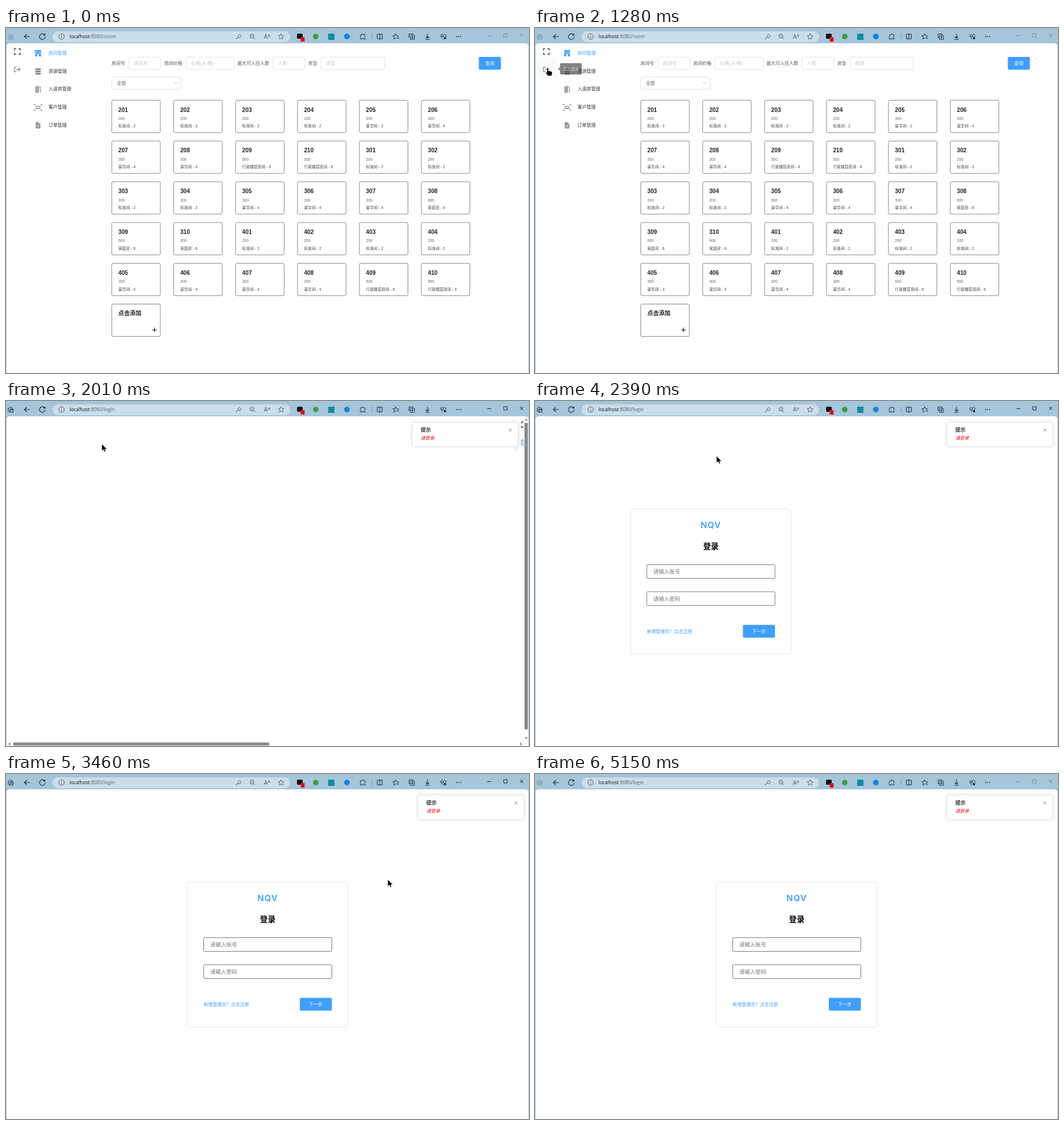
An HTML page with a canvas that plays this animation: 922 px wide and 608 px high, repeating every 5.19 s.

```html
<!DOCTYPE html>
<html lang="zh-CN">
<head>
<meta charset="utf-8">
<title>房间管理</title>
<style>
html, body { margin: 0; width: 100%; height: 100%; overflow: hidden; background: #a4c5da; }
canvas { display: block; }
</style>
</head>
<body>
<canvas id="stage" width="922" height="608"></canvas>
<script>
const ctx = document.getElementById('stage').getContext('2d');
const LOOP = 5190;
const UI = '"Liberation Sans", "Noto Sans CJK SC", "Noto Sans CJK", sans-serif';
const BLUE = '#409eff', GRAY = '#8b8e94', DARK = '#222';

// The screen refreshes in bursts: [first, last, count]
const steps = [0];
for (const [a, b, n] of [[230, 690, 6], [790, 1280, 6], [1370, 1820, 6], [1910, 2390, 6],
  [2480, 2990, 7], [3460, 3940, 6], [4030, 4310, 4], [5150, 5150, 1]])
  for (let i = 0; i < n; i++) steps.push(a + (n > 1 ? (b - a) * i / (n - 1) : 0));

const pointerPath = [
  [230, 587, 586], [690, 134, 192], [1084, 40, 85], [1182, 22, 70], [1280, 20, 69],
  [1640, 20, 69], [1820, 70, 70], [2006, 169, 76], [2390, 320, 97], [2650, 597, 143],
  [2990, 673, 186], [3460, 673, 186], [3940, 718, 301], [4030, 732, 370], [4217, 773, 583], [4310, 773, 583]
];

const clamp = v => Math.max(0, Math.min(1, v));

// cubic-bezier(.25, .1, .25, 1)
function ease(x) {
  if (x <= 0 || x >= 1) return clamp(x);
  const curve = (s, a, b) => 3 * (1 - s) ** 2 * s * a + 3 * (1 - s) * s * s * b + s ** 3;
  let lo = 0, hi = 1;
  for (let i = 0; i < 20; i++) {
    const mid = (lo + hi) / 2;
    if (curve(mid, .25, .25) < x) lo = mid; else hi = mid;
  }
  return curve(lo, .1, 1);
}

// y is the vertical middle of the line
function text(s, x, y, size, color, style = '', font = UI) {
  ctx.font = `${style} ${size}px ${font}`;
  ctx.fillStyle = color;
  ctx.fillText(s, x, y + size * .37);
  return ctx.measureText(s).width;
}

function box(x, y, w, h, r, fill, stroke, width = 1) {
  ctx.beginPath();
  ctx.roundRect(x, y, w, h, r);
  if (fill) { ctx.fillStyle = fill; ctx.fill(); }
  if (stroke) { ctx.strokeStyle = stroke; ctx.lineWidth = width; ctx.stroke(); }
}

function shape(x, y, d, stroke, width = 1, fill) {
  const path = new Path2D(d);
  ctx.save();
  ctx.translate(x, y);
  if (fill) { ctx.fillStyle = fill; ctx.fill(path); }
  if (stroke) { ctx.strokeStyle = stroke; ctx.lineWidth = width; ctx.stroke(path); }
  ctx.restore();
}

function dot(x, y, r, fill, stroke) {
  box(x - r, y - r, 2 * r, 2 * r, r, fill, stroke);
}

const STAR = 'M0-5L1.5-1.7 5-1.3 2.4 1.1 3.1 4.6 0 2.9-3.1 4.6-2.4 1.1-5-1.3-1.5-1.7Z';

function drawBrowser(route, focused) {
  const ink = '#1d2b35', soft = '#465b69', chrome = focused ? ink : '#7793a4';
  ctx.fillStyle = '#a4c5da';
  ctx.fillRect(0, 0, 922, 608);
  box(82, 6, 419, 19, 9.5, '#cbdde8');
  box(1, 27, 920, 590, 5, '#fefefe');

  shape(8, 15, 'M-4-2L0-4.5 4-2M-4-2V3L-1 4.5M-1-1H4.500V4.500H-1ZM-1 1H4', chrome);
  shape(37, 15, 'M5 0H-4.500M-.5-4L-4.500 0-.5 4', ink, 1.1);
  shape(64, 15, 'M4.300-2.500A5 5 0 1 0 5 .5M4.700-5V-2.200H1.800', ink, 1.1);
  dot(98, 15, 4.8, null, soft);
  shape(98, 15, 'M0-2.500V-1.400M0-.3V2.600', soft);
  const w = text('localhost', 112, 15, 8.5, '#111', '', '"Open Sans", "Noto Sans", sans-serif');
  text(':8080/' + route, 112 + w, 15, 8.5, '#566873', '', '"Open Sans", "Noto Sans", sans-serif');

  shape(410, 15, 'M-.5 .8L-4 4.300V2.800M-.5 .8A2.600 2.600 0 1 1 1 2Z', soft);
  shape(434, 15, 'M2.300 2L4.800 4.500M3-.8A3.500 3.500 0 1 1-4-.8A3.500 3.500 0 1 1 3-.8M-2-.8H1', soft);
  shape(460, 15, 'M-5 4L-2-4 1 4M-4 1.500H0M2-3Q3.500-2 2.500 0M4-4Q5.500-2 4 1', soft, .9);
  shape(485, 15, STAR, soft, .9);

  box(513, 10, 10, 9, 2, '#111');
  box(519.500, 16, 7, 8, 1, '#f3131d');
  text('1', 521.700, 20, 6, '#111');
  dot(546, 15, 4.800, '#3f9a3d');
  box(568, 10, 11, 11, 0, '#168ba0');
  dot(601, 15, 5, '#1683e5');
  shape(629, 15, 'M-4-3H-1.500A1.500 1.500 0 0 1 1.500-3H4V-.5A1.500 1.500 0 0 0 4 2V4.500H1.500A1.500 1.500 0 0 0-1.500 4.500H-4V2A1.500 1.500 0 0 1-4-.5Z', ink);
  shape(645, 15, 'M0-5V5', '#7d9aab');
  shape(659, 15, 'M-4.500-4H4.500V4H-4.500ZM0-5.500V5.500', ink);
  shape(687, 15, 'M1.500-1.500L0-4.800-1.500-1.500-5-1.200-2.500 1-3.200 4.500 0 2.500M2.500-1.500H5.500M1.500 1H5.500M2.500 3.500H5.500', ink);
  shape(715, 15, 'M-2-2H5V5H-2ZM-3 2H-4.500V-4.500H2.500V-3M1.500-.5V3.500M-.5 1.500H3.500', ink);
  shape(743, 15, 'M0-5V3M-3 0L0 3 3 0M-4 5H4', ink, 1.1);
  shape(771, 15, 'M0 4.500L-4 .5C-6-2-2.500-6 0-2.500C2.500-6 6-2 4 .5M-4 0H-1L0-1.500 1 1H2', ink);
  dot(774, 18, 2, ink);
  for (const x of [794.500, 798, 801.500]) dot(x, 15, .9, ink);

  shape(852, 13.500, 'M-3.500 0H3.500', chrome);
  shape(880.500, 13, 'M-3-3H3V3H-3Z', chrome);
  shape(909, 13, 'M-3-3L3 3M3-3L-3 3', chrome);
}

function drawMenu(hovered, exitColor, hoverWidth) {
  if (hovered) {
    ctx.fillStyle = hoverWidth < 20 ? '#e9f4ff' : '#f6faff';
    ctx.fillRect(2, 57, hoverWidth, 31);
  }
  shape(20, 41.500, 'M-2-5H-5V-2M2-5H5V-2M-2 5H-5V2M2 5H5V2', '#4b4d52', 1.6);
  shape(20, 73, 'M-1.500-4H-5V4H-1.500M-2.500 0H4.500M2-3L5 0 2 3', exitColor, 1.4);

  ['房间管理', '资源管理', '入退房管理', '客户管理', '订单管理'].forEach((label, i) =>
    text(label, 75, 44 + i * 31.650, 8, i ? '#303133' : BLUE));
  shape(56.500, 44.500, 'M-5.500-5.500H5.500V-4H5V4H5.500V5.500H1.500V3A1.500 1.500 0 0 0-1.500 3V5.500H-5.500V4H-5V-4H-5.500Z', null, 0, BLUE);
  for (const y of [-2.500, .5])
    for (const x of [-3, 0, 3]) { ctx.fillStyle = '#fff'; ctx.fillRect(55.800 + x, 44 + y, 1.400, 1.400); }
  for (const y of [-5.500, -1.500, 2.500]) box(51.500, 76.500 + y, 10, 3.300, [2, 2, 3, 3], GRAY);
  shape(56.500, 108, 'M-5.500 4.500H-4V-4L1-5.500V5.500H-4M2-4H4V4.500H5.500', GRAY, 1.200);
  shape(56.500, 108, 'M-3.500-3.800L1-5.500V5.500H-3.500Z', null, 0, '#a5a8ad');
  shape(56.500, 140, 'M-4-5.500H-6.500V-3M4-5.500H6.500V-3M-4 5.500H-6.500V3M4 5.500H6.500V3', GRAY, 1.200);
  for (const x of [-3, 0, 3]) {
    dot(56.500 + x, 138.500 - (x ? 0 : .5), 1.200, GRAY);
    box(55.200 + x, 140.500, 2.600, 2.500, 1, GRAY);
  }
  shape(56.500, 171.500, 'M-4-5.500H1.500L4-3V5.500H-4Z', null, 0, GRAY);
  shape(56.500, 171.500, 'M-2 0H2M-2 2.500H2M1.500-5.500V-3H4', '#fff', .9);
}

function drawField(x, y, w, label, moving, color = '#c0c4c0') {
  if (moving) shape(x + 3, y, `M0 .5H${w - 4}M0 22H${w - 4}`, '#d8e9ee');
  else box(x + .5, y + .5, w - 1, 21.500, 2, '#fff', '#d8e9ee');
  text(label, x + 9.500, y + 11, 8, color);
}

function roomInfo(floor, n) {
  if (n <= 4) return [200, '标准间 - 2'];
  if (floor === 3 && n >= 8) return [600, '家庭房 - 6'];
  if (n >= 9) return [500, '行政楼层房间 - 6'];
  return [300, floor === 2 && n === 5 ? '豪华间 - 2' : '豪华间 - 4'];
}

function drawRooms(moving) {
  for (const [s, x] of [['房间号', 186], ['房间价格', 279], ['最大可入住人数', 408], ['房型', 533]])
    text(s, x, 62, 8, '#55585e');
  for (const [s, x, w] of [['房间号', 216, 57], ['价格(￥/晚)', 317, 86], ['人数', 470, 57], ['房型', 555, 113]])
    drawField(x, 51, w, s, moving);
  drawField(186, 86, 123, '全部', moving, '#606266');
  shape(299, 97, 'M-3-1.500L0 1.500 3-1.500', '#b4b8bf', .9);
  box(833.500, 51, 39, 22.500, 2, BLUE);
  text('查询', 845, 62, 8, '#fff');

  for (let i = 0; i <= 30; i++) {
    const x = 186.500 + i % 6 * 109.150, y = 127.300 + Math.floor(i / 6) * 71.850;
    box(x, y, 85.500, 57, 2, '#fff', '#77797d', .9);
    if (i === 30) {
      text('点击添加', x + 11.500, y + 16, 10.200, DARK, 'bold');
      shape(x + 75.300, y + 45.500, 'M-4 0H4M0-4V4', DARK, 1.200);
      continue;
    }
    const floor = 2 + Math.floor(i / 10), n = i % 10 + 1;
    const [price, kind] = roomInfo(floor, n);
    text(floor * 100 + n, x + 11.500, y + 16.500, 10.200, DARK, 'bold');
    text(price, x + 11.500, y + 32, 6.850, '#666');
    text(kind, x + 11.500, y + 45.500, 6.850, '#444');
  }
}

function drawTooltip(alpha) {
  ctx.globalAlpha = alpha;
  box(44, 62, 38.500, 20, 2, '#303133');
  shape(44, 72, 'M0-3L-3.500 0 0 3Z', null, 0, '#303133');
  text('退出登录', 49.500, 72, 6.850, '#fff');
  ctx.globalAlpha = 1;
}

function drawLogin() {
  box(319.500, 190.500, 283.500, 255.500, 5, '#fefefe', '#e6e8ec');
  ctx.textAlign = 'center';
  ctx.letterSpacing = '1px';
  text('NQV', 461.500, 218.700, 15, BLUE, '600', 'Inter, sans-serif');
  ctx.letterSpacing = '0px';
  text('登录', 461.500, 256, 13.700, '#000', 'bold');
  ctx.textAlign = 'left';
  ['请输入账号', '请输入密码'].forEach((label, i) => {
    box(348.500, 288.300 + i * 47.800, 226, 24.300, 2, '#fff', '#767676');
    text(label, 360, 300.500 + i * 48, 9.500, '#757575');
  });
  text('新增管理员？点击注册', 348.500, 406, 8, BLUE);
  box(518, 394.500, 56.500, 22.500, 2, BLUE);
  text('下一步', 534, 406, 8, '#fff');
}

function drawNotice(x, alpha) {
  ctx.save();
  ctx.globalAlpha = alpha;
  ctx.shadowColor = 'rgba(0,0,0,.13)';
  ctx.shadowBlur = 6;
  box(x, 37, 187, 43, 4, '#fff');
  ctx.shadowColor = 'transparent';
  box(x + .5, 37.500, 186, 42.500, 4, null, '#e9ebf0');
  text('提示', x + 15, 50.500, 9.100, '#303133', 'bold');
  text('请登录', x + 15, 65.500, 8, '#f00', 'italic');
  shape(x + 173, 51, 'M-2.700-2.700L2.700 2.700M2.700-2.700L-2.700 2.700', '#85888e', .9);
  ctx.restore();
}

function drawScrollbars(shift) {
  const thumb = '#8b8b8b';
  ctx.fillStyle = '#fcfcfc';
  ctx.fillRect(913, 28, 8, 580);
  ctx.fillRect(2, 601, 919, 7);
  box(914, 38, 6, 541, 3, thumb);
  box(12.500, 601.700, 891 * 908 / (896 + shift), 5.500, 2.800, thumb);
  shape(917, 33, 'M-3 1.500L0-2 3 1.500Z', null, 0, thumb);
  shape(917, 594, 'M-3-1.500L0 2 3-1.500Z', null, 0, thumb);
  shape(6, 604.500, 'M1.500-3L-2 0 1.500 3Z', null, 0, thumb);
  shape(908, 604.500, 'M-1.500-3L2 0-1.500 3Z', null, 0, thumb);
}

function drawPointer(t, hand) {
  if (t < 230 || t >= 4310) return;
  const i = pointerPath.findIndex(p => p[0] > t);
  const [t0, x0, y0] = pointerPath[i - 1], [t1, x1, y1] = pointerPath[i];
  const k = (t - t0) / (t1 - t0), x = x0 + (x1 - x0) * k, y = y0 + (y1 - y0) * k;
  if (hand) shape(x + 2, y + 1.500, 'M-1.200 0Q0-1.300 1.200 0V4.500L7 6Q8.500 6.500 8.500 8.500L7.300 14H1L-3.500 8.500Q-2.800 6.800-1.200 8Z', '#fff', .8, '#000');
  else shape(x, y, 'M0 0V12L2.800 9.500 4.700 13.600 6.700 12.700 5 8.900H9Z', '#fff', .5, '#000');
}

function draw(t) {
  const leaving = t >= 1640 && t < 2100;
  const shift = 908 * ease((t - 1617.500) / 463);
  drawBrowser(t < 1550 ? 'room' : 'login', t >= 1460 && t < 5150);

  ctx.save();
  ctx.beginPath();
  ctx.rect(1, 27, leaving ? 912 : 920, leaving ? 574 : 581);
  ctx.clip();
  if (t < 2100) {
    ctx.translate(shift, 0);
    drawMenu(t >= 1182, t < 1550 ? GRAY : t < 1730 ? '#3c4654' : BLUE, leaving ? 8 : 36);
    drawRooms(leaving);
  } else {
    ctx.translate(-921 * (1 - ease((t - 2142) / 463)), 0);
    drawLogin();
  }
  ctx.restore();

  if (t >= 1280 && t < 1550) drawTooltip(t < 1370 ? .6 : 1);
  const shown = ease((t - 1690) / 300);
  if (shown > 0) drawNotice((leaving ? 716 : 726) + 187 * (1 - shown), shown);
  if (leaving) drawScrollbars(shift);
  drawPointer(t, t >= 1182 && t < 1640);
}

const start = performance.now();
function tick() {
  const t = (performance.now() - start) % LOOP;
  draw(steps.findLast(s => s <= t + .5));
  requestAnimationFrame(tick);
}
tick();
</script>
</body>
</html>
```
